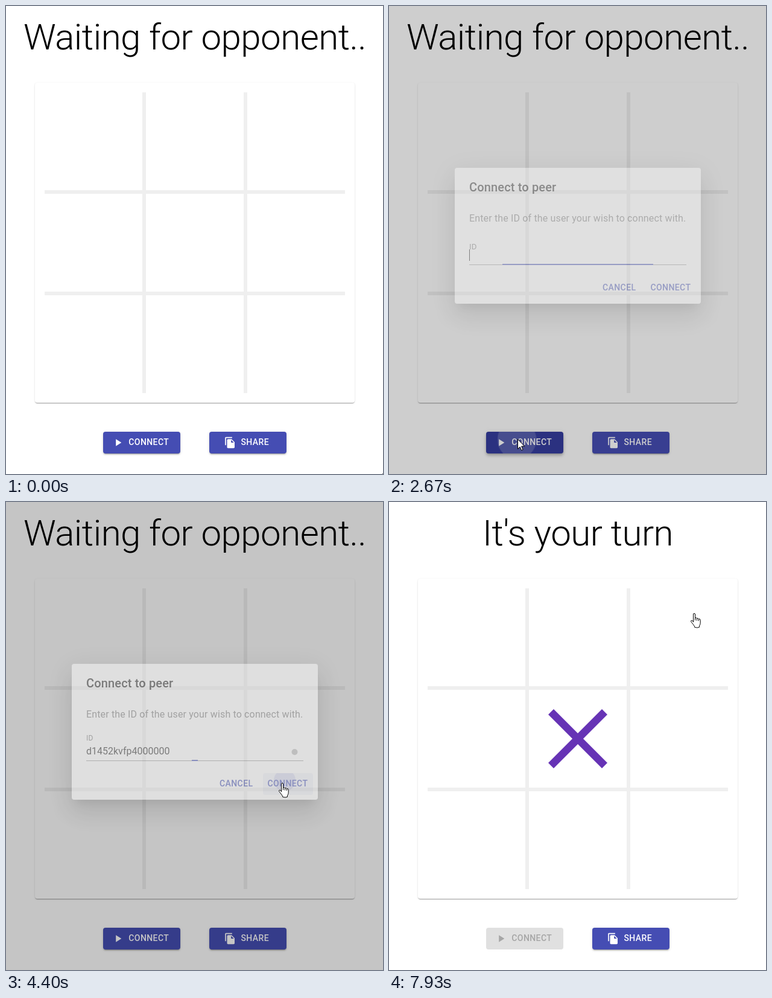
These frames come from a looping animation (625 px wide and 775 px high, 8000 ms). An HTML page:

```html
<!DOCTYPE html>
<html lang="en">
<head>
<meta charset="utf-8">
<title>Tic-tac-toe with a peer</title>
<style>
:root {
  --std: cubic-bezier(.4, 0, .2, 1);
  --out: cubic-bezier(0, 0, .2, 1);
  --blue: #454db3;
  --dark: #353c9d;
  --low: 0 3px 1px -2px rgba(0,0,0,.2), 0 2px 2px 0 rgba(0,0,0,.14), 0 1px 5px 0 rgba(0,0,0,.12);
  --high: 0 2px 4px -1px rgba(0,0,0,.2), 0 4px 5px 0 rgba(0,0,0,.14), 0 1px 10px 0 rgba(0,0,0,.12);
}
html, body { margin: 0; width: 100%; height: 100%; overflow: hidden; background: #fff; }
#stage {
  position: relative; width: 625px; height: 775px; overflow: hidden;
  font-family: Roboto, Arial, sans-serif;
}
#stage div, #stage svg { position: absolute; }
.full { left: 0; top: 0; width: 625px; height: 775px; }

.title { font-size: 60px; font-weight: 300; letter-spacing: -.00833em; text-anchor: middle; }
.wait { animation: wait 8s step-end infinite; }
.theirs { animation: theirs 8s step-end infinite; }
.yours { animation: yours 8s step-end infinite; }

.paper {
  left: 48px; top: 127px; width: 530px; height: 530px; border-radius: 4px; background: #fff;
  box-shadow: 0 2px 1px -1px rgba(0,0,0,.2), 0 1px 1px 0 rgba(0,0,0,.14), 0 1px 3px 0 rgba(0,0,0,.12);
}
.grid { stroke: #efefef; stroke-width: 6; }
.cross { stroke: #6633b5; stroke-width: 12.7; }

.btn {
  top: 705px; width: 128px; height: 36px; border-radius: 4px;
  color: #fff; background: var(--blue); box-shadow: var(--low);
}
.btn svg { left: 0; top: 0; border-radius: 4px; overflow: hidden; fill: currentColor; }
.label { font-size: 14px; font-weight: 500; letter-spacing: .02857em; }
.connect { left: 161px; animation: connect 8s var(--std) infinite; }
.share { left: 337px; animation: share 8s var(--std) infinite; }
.ripple { transform-box: fill-box; transform-origin: center; opacity: 0; }
.press { animation: press 8s var(--std) infinite; }
.confirm { animation: confirm 8s var(--std) infinite; }

.backdrop { background: rgba(0,0,0,.5); }
.modal { animation: modal 8s var(--std) infinite; }
.sheet {
  left: 109px; top: 268px; width: 408px; height: 225px; border-radius: 4px; background: #fff;
  box-shadow: 0 11px 15px -7px rgba(0,0,0,.2), 0 24px 38px 3px rgba(0,0,0,.14), 0 9px 46px 8px rgba(0,0,0,.12);
}
.head { font-size: 20px; font-weight: 500; letter-spacing: .0075em; }
.body { font-size: 16px; letter-spacing: .00938em; fill-opacity: .54; }
.field { font-size: 16px; fill-opacity: .87; animation: typed 8s step-end infinite; }
.shrink { animation: shrink 8s var(--out) infinite; }
.line { transform-origin: 313px 428px; animation: line 8s var(--out) infinite; }
.caret { animation: caret 8s step-end infinite; }
.badge { animation: badge 8s step-end infinite; }
.action { fill: #3f4db5; }
.hover { animation: hover 8s var(--std) infinite; }

.cursor { overflow: visible; fill: #fff; stroke: #000; stroke-linejoin: round; animation: move 8s linear infinite; }
.arrow { animation: arrow 8s step-end infinite; }
.hand { animation: hand 8s step-end infinite; }

@keyframes wait { 0% { visibility: visible } 60%, 100% { visibility: hidden } }
@keyframes theirs { 0% { visibility: hidden } 60% { visibility: visible } 87.5%, 100% { visibility: hidden } }
@keyframes yours { 0% { visibility: hidden } 87.5%, 100% { visibility: visible } }

@keyframes share {
  0%, 18.7% { background: var(--blue); box-shadow: var(--low) }
  21.6%, 23.2% { background: var(--dark); box-shadow: var(--high) }
  26.3%, 100% { background: var(--blue); box-shadow: var(--low) }
}
@keyframes connect {
  0%, 25% { background: var(--blue); box-shadow: var(--low); color: #fff }
  28.1%, 33% { background: var(--dark); box-shadow: var(--high); color: #fff }
  36.1%, 59.9% { background: var(--blue); box-shadow: var(--low); color: #fff }
  60% { color: #a6a6a6 }
  63%, 100% { background: #e0e0e0; box-shadow: 0 0 0 0 transparent, 0 0 0 0 transparent, 0 0 0 0 transparent; color: #a6a6a6 }
}
@keyframes press {
  0%, 31.19% { transform: scale(0); opacity: 0 }
  31.2% { transform: scale(0); opacity: .1 }
  38.08% { transform: scale(1); opacity: .3 }
  41.6%, 100% { transform: scale(1); opacity: 0 }
}
@keyframes confirm {
  0%, 53.03% { transform: scale(0); opacity: 0 }
  53.04% { transform: scale(0); opacity: .1 }
  59.9%, 100% { transform: scale(1); opacity: .3 }
}
@keyframes modal {
  0%, 32.475% { opacity: 0 }
  35.29%, 54.1% { opacity: 1 }
  56.54%, 100% { opacity: 0 }
}
@keyframes shrink {
  0%, 32.475% { transform: translate(133px, 407px) }
  34.975%, 100% { transform: translate(133px, 384.8px) scale(.75) }
}
@keyframes line {
  0%, 32.475% { transform: scaleX(0) }
  34.975%, 53.04% { transform: scaleX(1) }
  55.54%, 100% { transform: scaleX(0) }
}
@keyframes typed { 0% { visibility: hidden } 40.8%, 100% { visibility: visible } }
@keyframes badge { 0% { visibility: hidden } 36.5%, 100% { visibility: visible } }
@keyframes caret {
  0% { opacity: 1; transform: none }
  38.7% { opacity: 0; transform: none }
  40.8% { opacity: 1; transform: translateX(138px) }
  47.1%, 100% { opacity: 0; transform: translateX(138px) }
}
@keyframes hover { 0%, 42.1% { opacity: 0 } 45.2%, 100% { opacity: 1 } }

@keyframes arrow {
  0% { visibility: visible }
  18.7% { visibility: hidden }
  23.3% { visibility: visible }
  25.1% { visibility: hidden }
  32.5% { visibility: visible }
  42.1%, 100% { visibility: hidden }
}
@keyframes hand {
  0% { visibility: hidden }
  18.7% { visibility: visible }
  23.3% { visibility: hidden }
  25.1% { visibility: visible }
  32.5% { visibility: hidden }
  42.1%, 100% { visibility: visible }
}
@keyframes move {
  0%, 8.5% { transform: translate(624px, 774px); animation-timing-function: ease-in-out }
  19.1%, 21.7% { transform: translate(380px, 713px); animation-timing-function: ease-in-out }
  28.3%, 34.5% { transform: translate(213px, 717px); animation-timing-function: ease-in }
  41.66% { transform: translate(420px, 473px) }
  42.5% { transform: translate(440px, 467px) }
  47.5%, 49.9% { transform: translate(463px, 461px) }
  50%, 54.17% { transform: translate(462px, 461px) }
  55.83% { transform: translate(454px, 469px); animation-timing-function: ease-out }
  63.3%, 78.3% { transform: translate(389px, 460px); animation-timing-function: step-end }
  78.33% { transform: translate(385px, 459px) }
  80%, 82.4% { transform: translate(355px, 460px) }
  83.33%, 88.5% { transform: translate(348px, 449px); animation-timing-function: ease-in-out }
  97.5% { transform: translate(491px, 218px) }
  99.16%, 100% { transform: translate(506px, 184px) }
}
</style>
</head>
<body>
<div id="stage">
  <div class="paper"></div>
  <svg class="full" width="625" height="775">
    <g class="title">
      <text class="wait" x="313" y="72">Waiting for opponent..</text>
      <text class="theirs" x="313" y="72">Their turn..</text>
      <text class="yours" x="313" y="72">It's your turn</text>
    </g>
    <path class="grid" d="M229 143V641M397 143V641M64 308H562M64 476H562"/>
    <path class="cross yours" d="M268.5 347.5l89 89M357.5 347.5l-89 89"/>
  </svg>

  <div class="btn connect">
    <svg width="128" height="36">
      <path transform="translate(14.5 8) scale(.8333)" d="M8 5v14l11-7z"/>
      <text class="label" x="42.3" y="22">CONNECT</text>
      <circle class="ripple press" cx="51" cy="13" r="82"/>
    </svg>
  </div>
  <div class="btn share">
    <svg width="128" height="36">
      <path transform="translate(24.5 8) scale(.8333)" d="M16 1H4c-1.1 0-2 .9-2 2v14h2V3h12V1zm-1 4l6 6v10c0 1.1-.9 2-2 2H7.99C6.89 23 6 22.1 6 21V7c0-1.1.89-2 1.99-2h7zm-1 7h5.5L14 6.5V12z"/>
      <text class="label" x="52.5" y="22">SHARE</text>
    </svg>
  </div>

  <div class="full backdrop modal"></div>
  <div class="full modal">
    <div class="sheet"></div>
    <svg class="full" width="625" height="775">
      <clipPath id="ok"><rect x="426" y="449" width="83" height="36" rx="4"/></clipPath>
      <text class="head" x="133" y="307" fill-opacity=".87">Connect to peer</text>
      <text class="body" x="133" y="357">Enter the ID of the user your wish to connect with.</text>
      <g class="shrink"><text class="body" y="13.5">ID</text></g>
      <text class="field" x="133" y="418">d1452kvfp4000000</text>
      <circle class="badge" cx="478.5" cy="414" r="5" fill="#b5b5b5"/>
      <rect class="caret" x="133" y="403" width="1" height="19"/>
      <rect x="133" y="428" width="360" height="1" fill-opacity=".42"/>
      <rect class="line" x="133" y="427" width="360" height="2" fill="#3f4db5"/>
      <g class="action">
        <rect class="hover" x="426" y="449" width="83" height="36" rx="4" fill-opacity=".08"/>
        <text class="label" x="354" y="471">CANCEL</text>
        <text class="label" x="433.5" y="471">CONNECT</text>
        <g clip-path="url(#ok)"><circle class="ripple confirm" cx="462" cy="461" r="55"/></g>
      </g>
    </svg>
  </div>

  <svg class="cursor" width="20" height="26">
    <path class="arrow" d="M.5.5V16.6L4.2 13.1 6.6 18.7 9 17.7 6.6 12.1H11.6Z"/>
    <g class="hand" transform="translate(-6 0)">
      <path d="M4.5 15V2a1.5 1.5 0 0 1 3 0v6q2.8-1 3 .8 2.6-.9 2.9 1 2.6-.6 2.8 1.4v5q0 2.5-1.5 4.6l-.4 2.7q-3 1.2-7.5 0-.2-2-2.2-4.4L1 14.6q-1-1.8.4-2.6 1.4-.4 3.1 2.5Z"/>
      <path fill="none" d="M7.5 8v4M10.5 9v3.5M13.4 10v3"/>
    </g>
  </svg>
</div>
<script>
// Hold every CSS animation to a common 15 fps clock.
const LOOP = 8000, STEP = 1000 / 15;
const parts = document.getAnimations();
const start = performance.now();
parts.forEach(part => part.pause());

function tick() {
  const frame = Math.floor((performance.now() - start) / STEP + .06);
  const time = (frame * STEP) % LOOP + .01;
  parts.forEach(part => { part.currentTime = time; });
  requestAnimationFrame(tick);
}
tick();
</script>
</body>
</html>
```
